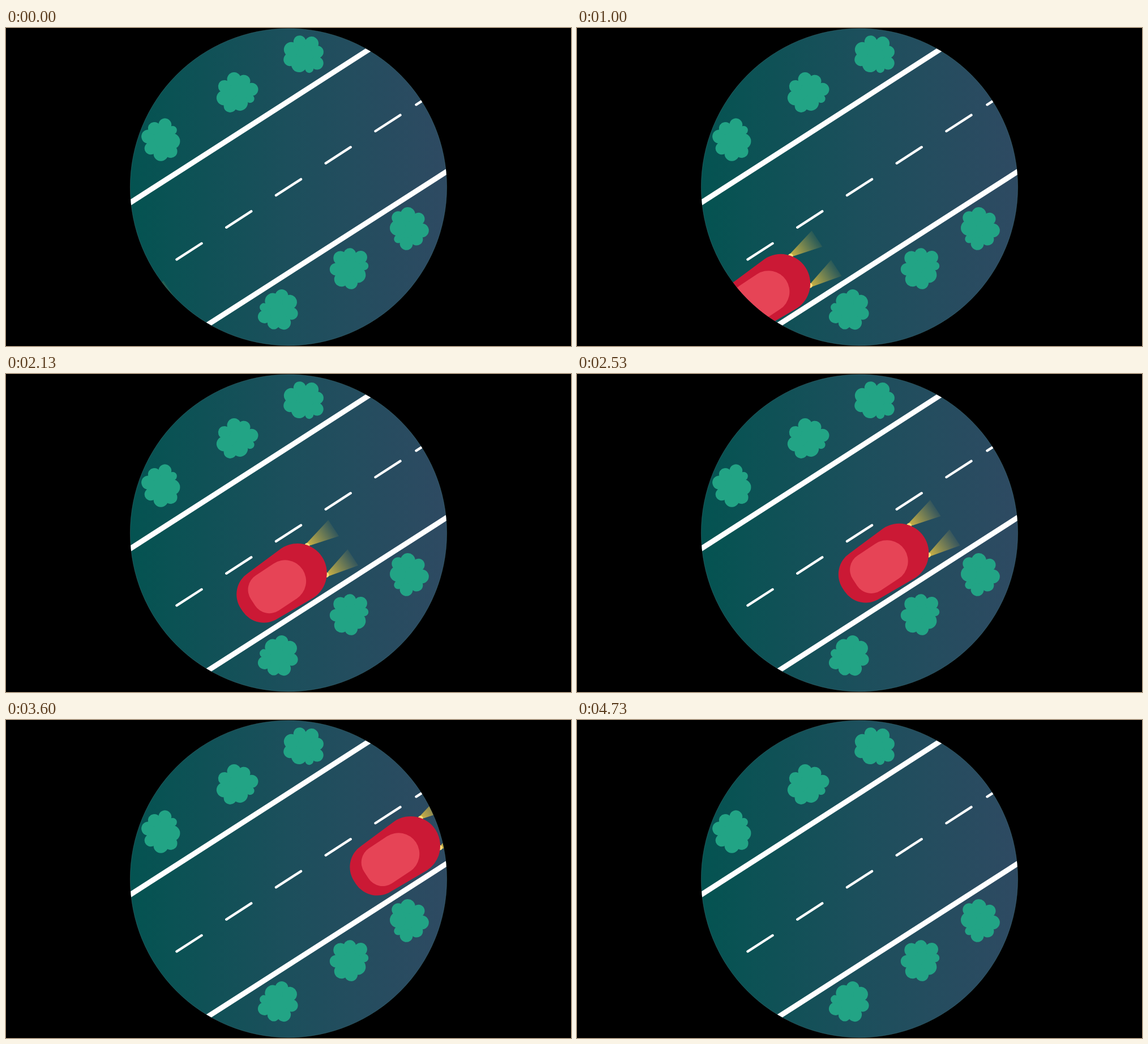
Recreate the animation shown at these times as an HTML page. Size 998x561 px, loop 4.99 s.

```html
<!DOCTYPE html>
<html lang="en">
<head>
<meta charset="utf-8">
<title>Night drive</title>
<style>
html, body { margin: 0; width: 100%; height: 100%; overflow: hidden; background: #000; }
svg { display: block; width: 100vw; height: 100vh; }
</style>
</head>
<body>
<svg viewBox="0 0 998 561">
  <defs>
    <linearGradient id="ground">
      <stop offset="0" stop-color="#045351"/>
      <stop offset=".5" stop-color="#1c4f5c"/>
      <stop offset="1" stop-color="#2e4a62"/>
    </linearGradient>
    <linearGradient id="glow" gradientUnits="userSpaceOnUse" x1="41" x2="97" y1="0" y2="0">
      <stop offset="0" stop-color="#dcbc42" stop-opacity=".95"/>
      <stop offset="1" stop-color="#c8b04a" stop-opacity=".1"/>
    </linearGradient>
    <clipPath id="disc"><circle cx="499" cy="280.5" r="279.7"/></clipPath>
    <g id="lamp">
      <path d="M39-34 97-48V-14L46-28Z" fill="url(#glow)"/>
      <circle cx="41" cy="-31" r="4.5" fill="#fbdf7c"/>
    </g>
    <g id="bush" fill="#22a485"><circle r="26"/></g>
  </defs>
  <circle cx="499" cy="280.5" r="279.6" fill="url(#ground)" stroke="#4a7f88" stroke-opacity=".5" stroke-width=".8"/>
  <g id="scene" clip-path="url(#disc)">
    <g stroke="#fff" fill="none">
      <path d="M210 314.3 650 32.2M350 527.4 790 245.8" stroke-width="9.3"/>
      <path id="dashes" stroke-width="4.4" stroke-linecap="round"/>
    </g>
    <g id="bushes"></g>
    <g id="car">
      <use href="#lamp"/>
      <use href="#lamp" transform="scale(1 -1)"/>
      <path d="M0-52A52 52 0 0 1 0 52L-73 48A45 45 0 0 1-118 3V-3A45 45 0 0 1-73-48Z" fill="#cb1935"/>
      <path d="M-26-37A37 37 0 0 1-26 37H-64A30 30 0 0 1-94 7V-7A30 30 0 0 1-64-37Z" fill="#e64456"/>
    </g>
  </g>
</svg>
<script>
const el = id => document.getElementById(id);

// One bush shape: a ring of lobes (angle, distance, radius) around a core
const lobes = [
  [0, 27, 7.5], [46, 19.5, 14], [90, 26, 11.5], [132, 23.7, 13],
  [183, 23.3, 11], [237, 23.5, 12.3], [281, 24.3, 11], [325, 28, 11.5]
];
el('bush').innerHTML += lobes.map(([a, d, r]) =>
  `<circle cx="${d}" r="${r}" transform="rotate(${a})"/>`).join('');

// Where the bush is stamped: x, y, turn
const spots = [
  [274, 198, -41], [406.5, 113.6, 24], [526, 46.4, 69],
  [482, 498, 191], [606, 423.6, -8], [711.5, 352.7, 134]
];
el('bushes').innerHTML = spots.map(([x, y, turn]) =>
  `<use href="#bush" transform="translate(${x} ${y}) rotate(${turn})"/>`).join('');

const dash = (x, y) => `M${x} ${y}l44-28.4`;
let dashes = dash(724.5, 135.3);
for (let i = 0; i < 5; i++) dashes += dash(301.5 + 87.75 * i, 408.4 - 56.6 * i);
el('dashes').setAttribute('d', dashes);

const LOOP = 4990, STEP = 1000 / 15;

// Steady drive along the lane, 15 steps a second on a 10 ms clock
function draw(ms) {
  const t = Math.floor(ms % LOOP / 10) * 10;
  const n = Math.floor((t + 4) / STEP);
  const x = 223.6 + 9.1 * n, y = 538.9 - 5.87 * n;
  el('car').setAttribute('transform', `translate(${x} ${y}) rotate(-33.4)`);
}

function tick() {
  draw(performance.now());
  requestAnimationFrame(tick);
}
tick();
</script>
</body>
</html>
```
